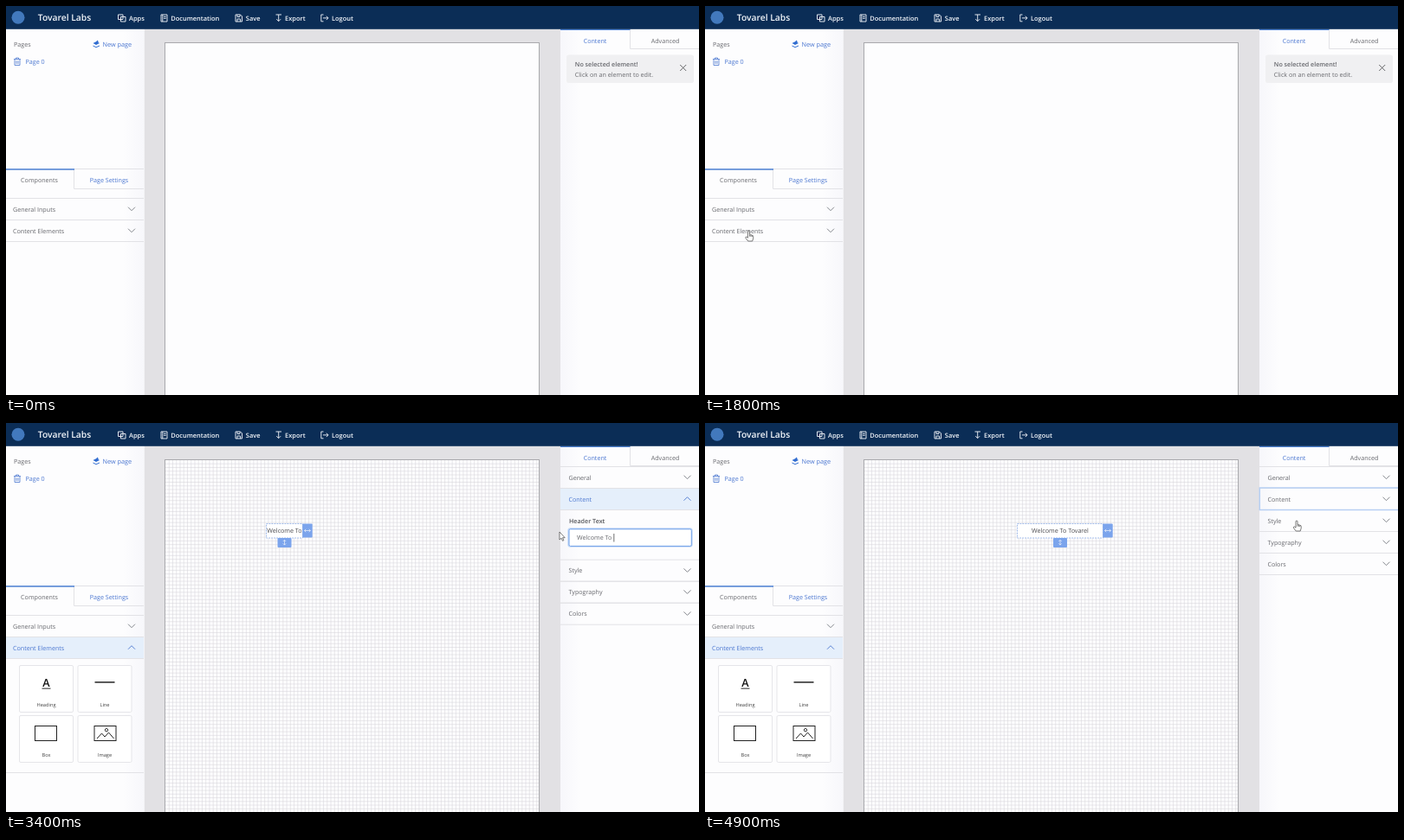
Animation of 800 by 450 pixels, one loop 5 s. Source, as an HTML page:

```html
<!DOCTYPE html>
<html lang="en">
<head>
<meta charset="utf-8">
<title>Page builder</title>
<style>
  html, body { margin: 0; width: 100%; height: 100%; overflow: hidden; background: #e2e1e4; }
  #stage { display: block; width: 800px; height: 450px; }
  text { font-family: "Open Sans", "Noto Sans", sans-serif; font-size: 7.15px; fill: #66676c;
         white-space: pre; text-rendering: geometricPrecision; }
  .mid { text-anchor: middle; }
  .link { fill: #4a76d0; }
  .bold { font-weight: 600; }
  .nav { font-size: 7.45px; font-weight: 600; fill: #f4f7fb; }
  .small { font-size: 5.7px; fill: #444; }
  .dark { fill: #4a4a4f; }
  .line { fill: none; stroke: #e2e2e6; }
  .ink { fill: none; stroke: #222; }
  .icon { fill: none; stroke: #f4f7fb; stroke-width: .9; }
  .grip { fill: none; stroke: #f4f7fb; stroke-width: .7; }
  .chev { fill: none; stroke: #777a80; stroke-width: .9; }
  .ring { fill: none; stroke: #b7cff3; stroke-width: 1.5; }
</style>
</head>
<body>
<svg id="stage" viewBox="0 0 800 450">
  <defs>
    <linearGradient id="shade">
      <stop offset="0" stop-color="#f7f7fb"/>
      <stop offset="1" stop-color="#fdfdfe"/>
    </linearGradient>
  </defs>
</svg>
<script>
const LOOP = 5000, STEP = 100;
const NAME = "Tovarel";
const PANEL = "#fdfdfe";
const stage = document.getElementById("stage");

function el(parent, tag, attrs = {}) {
  const node = document.createElementNS("http://www.w3.org/2000/svg", tag);
  set(node, attrs);
  parent.appendChild(node);
  return node;
}
function set(node, attrs) {
  for (const k in attrs) node.setAttribute(k, attrs[k]);
}
function show(node, on) { node.style.display = on ? "" : "none"; }
function rect(p, x, y, width, height, attrs) {
  return el(p, "rect", { x, y, width, height, ...attrs });
}
function path(p, d, cls, attrs) { return el(p, "path", { d, class: cls, ...attrs }); }
function label(p, x, y, str, cls = "") {
  const node = el(p, "text", { x, y: y + 2.6, class: cls });
  node.textContent = str;
  return node;
}
function move(node, x, y) { set(node, { transform: `translate(${x} ${y})` }); }

// ---------- page area ----------
rect(stage, 159, 26, 482, 424, { fill: "#e2e1e4" });
rect(stage, 183.5, 42.5, 432, 420, { fill: PANEL, stroke: "#a9a9ad" });
const grid = path(stage, gridPath(184, 43, 615, 450, 4.245), "", {
  fill: "none", stroke: "#d6d4da", "stroke-width": .53
});
function gridPath(x0, y0, x1, y1, gap) {
  let d = "";
  for (let x = x0 + gap; x < x1; x += gap) d += `M${x.toFixed(2)} ${y0}V${y1}`;
  for (let y = y0 + gap; y < y1; y += gap) d += `M${x0} ${y.toFixed(2)}H${x1}`;
  return d;
}

// ---------- heading element on the page ----------
const block = el(stage, "g");
const blockBox = rect(block, 0, 0, 42, 16.5, {
  fill: "#fff", stroke: "#86a9e6", "stroke-width": .8, "stroke-dasharray": "1.8 1.2"
});
const blockText = label(block, 0, 8.2, "", "mid dark");
const blockWrap = label(block, 0, 18, "", "mid dark");
const sideGrip = el(block, "g");
rect(sideGrip, 0, 0, 11.5, 16, { rx: 1, fill: "#7ba4ec" });
path(sideGrip, "M2.3 8H9.2M4 6.3L2.3 8L4 9.7M7.5 6.3L9.2 8L7.5 9.7", "grip");
const footGrip = el(block, "g");
rect(footGrip, -8, 0, 16, 11, { rx: 1, fill: "#7ba4ec" });
path(footGrip, "M0 2.4V8M-1.7 4L0 2.3L1.7 4M-1.7 6.4L0 8.1L1.7 6.4", "grip");

// ---------- side panels ----------
rect(stage, 0, 26, 159.5, 424, { fill: PANEL });
rect(stage, -159.5, 26, 24, 424, { fill: "url(#shade)", transform: "scale(-1 1)" });
rect(stage, 640, 26, 160, 424, { fill: PANEL });
rect(stage, 640, 26, 24, 424, { fill: "url(#shade)" });

label(stage, 9, 44, "Pages");
label(stage, 111.5, 44.3, "New page", "link").style.fontSize = "7.3px";
path(stage, "M100.5 43L104.5 41L108 43L104 45ZM100.5 45.5L104 47.3L108 45.5V46.5L104 48.3L100.5 46.5Z", "",
  { fill: "#2f6bd0" });
path(stage, "M105.5 39.8V42.6M104.1 41.2H106.9", "", { stroke: "#2f6bd0", "stroke-width": .9 });
label(stage, 22.5, 64.3, "Page 0", "link");
path(stage, "M9 61.5H17M11.5 61.3V60H14.5V61.3M10 61.8V68.5H16V61.8M12 63.3V67M14 63.3V67", "",
  { fill: "none", stroke: "#4a76d0", "stroke-width": .8 });

path(stage, "M79 188.5H159M78.5 189V211.5H159", "line");
rect(stage, 0, 188.2, 79, 1.5, { fill: "#4a7fd2" });
label(stage, 38.5, 201.6, "Components", "mid");
label(stage, 119, 201.4, "Page Settings", "mid link");

path(stage, "M720.5 27V49.5H800", "line");
rect(stage, 640, 26.5, 80.5, 1.5, { fill: "#4a7fd2" });
label(stage, 680, 40, "Content", "mid link");
label(stage, 761, 40, "Advanced", "mid");

// ---------- accordions ----------
function section(parent, x, w, name) {
  const g = el(parent, "g");
  const back = rect(g, x, 0, w, 25, { fill: "#e5effb" });
  path(g, `M${x} .5H${x + w}M${x} 25.5H${x + w}`, "line");
  const text = label(g, x + (x ? 9.5 : 8), 12.9, name);
  const chev = path(g, "", "chev");
  const mid = x ? 786.5 : 145;
  return {
    place(y, open) {
      move(g, 0, y);
      show(back, open);
      text.setAttribute("class", open ? "link" : "");
      chev.style.stroke = open ? "#4a76d0" : "";
      const s = open ? -2 : 2;
      set(chev, { d: `M${mid - 4} ${12.7 - s}L${mid} ${12.7 + s}L${mid + 4} ${12.7 - s}` });
    }
  };
}
function drawer(x, y, width) {
  return el(stage, "svg", { x, y, width, height: 0 });
}

function card(parent, i, name, art) {
  const g = el(parent, "g");
  move(g, 15.5 + (i % 2) * 67.5, 7.5 + Math.floor(i / 2) * 58);
  rect(g, 0, 0, 62, 54, { rx: 1.5, fill: "#fff", stroke: "#e5e5e9" });
  label(g, 31, 44.5, name, "mid small");
  art(g);
}
const frame = (x, y, w, h) => g => rect(g, x, y, w, h, { class: "ink" });

const inputs = drawer(0, 248, 159);
[["Input", frame(18, 14, 26, 11)],
 ["Text Area", frame(18, 11, 26, 18)],
 ["Checkbox", g => { frame(25, 13, 12, 12)(g); path(g, "M28 19L30.5 22L35 16", "ink"); }],
 ["Radio", g => el(g, "circle", { cx: 31, cy: 19, r: 6, class: "ink" })],
 ["Select", g => { frame(18, 14, 26, 11)(g); path(g, "M36 18L38.5 21L41 18", "ink"); }],
 ["Button", frame(20, 13, 22, 13)]
].forEach(([name, art], i) => card(inputs, i, name, art));

const parts = drawer(0, 273, 159);
[["Heading", g => {
   const a = label(g, 31, 22, "A", "mid bold");
   a.style.cssText = "font-size:12.6px;fill:#111";
   path(g, "M26 26.6H36", "ink");
 }],
 ["Line", g => path(g, "M19.5 19.4H42.5", "ink", { "stroke-width": 1.5 })],
 ["Box", frame(18, 12, 25, 17)],
 ["Image", g => {
   frame(19, 12, 25, 17)(g);
   path(g, "M22 26.5L27.5 20.5L31 24.5L35.5 19.5L41.5 26.5", "ink");
   el(g, "circle", { cx: 33, cy: 16.7, r: 1.7, class: "ink", "stroke-width": .9 });
 }]
].forEach(([name, art], i) => card(parts, i, name, art));
path(parts, "M0 131.5H159", "line");

const general = section(stage, 0, 159, "General Inputs");
const elements = section(stage, 0, 159, "Content Elements");
const leftRing = rect(stage, .3, 222.5, 158.7, 25.5, { class: "ring" });

const notice = el(stage, "g");
rect(notice, 647, 56.5, 147, 32.5, { rx: 2.5, fill: "#f0f0f2" });
label(notice, 656.8, 67.8, "No selected element!", "bold");
label(notice, 656.8, 79, "Click on an element to edit.");
path(notice, "M778.2 68L785.2 75M785.2 68L778.2 75", "chev", { style: "stroke:#55565a" });

const options = el(stage, "g");
const form = el(options, "svg", { x: 640, y: 100, width: 160, height: 0 });
label(form, 10, 13.4, "Header Text", "bold").style.fill = "#55565b";
const fieldGlow = rect(form, 9.5, 22.5, 142, 20, { rx: 2, fill: "none", stroke: "#c6daf7", "stroke-width": 2.4 });
const field = rect(form, 10, 22.8, 141.3, 19.6, { rx: 1.5, fill: "#fff" });
const mark = rect(form, 19, 27.5, 0, 10, { fill: "#a9cbf5" });
const fieldText = label(form, 19, 32.8, "");
const caret = rect(form, 19, 28, .7, 9.5, { fill: "#333" });
const rows = ["General", "Content", "Style", "Typography", "Colors"]
  .map(name => section(options, 640, 160, name));
const rightRing = rect(options, 640.3, 75, 161, 25.5, { class: "ring" });

// ---------- top bar ----------
rect(stage, 0, 0, 800, 26.8, { fill: "#0b2d56" });
el(stage, "circle", { cx: 14, cy: 13.3, r: 7.5, fill: "#4279bd" });
const brand = label(stage, 36.8, 14.6, NAME + " Labs", "nav");
brand.style.fontSize = "10.3px";
[[142, "Apps"], [190.3, "Documentation"], [276.8, "Save"], [322, "Export"], [376, "Logout"]]
  .forEach(([x, name]) => label(stage, x, 14.2, name, "nav"));
path(stage, "M129.5 10H135V15.5H129.5ZM132.5 12.5H138V18H132.5Z" +
  "M179 10H186V18H179ZM180.8 10V18M182 12.3H184.8M182 14.3H184.8" +
  "M265 10H270.5L272.5 12V18H265ZM267 10V12.5H270V10M267 18V15H270.5V18" +
  "M311.5 10H318M314.7 10V17.5M312.3 15.2L314.7 17.6L317.1 15.2" +
  "M366.5 10H363.8V17.8H366.5M366 13.9H372M369.8 11.7L372 13.9L369.8 16.1", "icon");

// ---------- pointer ----------
const arrow = path(stage, "M0 0V9L2.1 7.2L3.5 10.3L4.9 9.7L3.5 6.7H6.2Z", "",
  { fill: "#fff", stroke: "#444", "stroke-width": .7 });
const hand = path(stage,
  "M-1 1a1 1 0 0 1 2 0V4.3Q2 3.9 2.4 4.8Q3.5 4.5 3.8 5.4Q5.2 5.2 5.2 6.6V8.8L4.2 12H-.8" +
  "L-3.6 8.3Q-3.9 6.8-2.4 7L-1 8.2ZM1 4.5V6.6M2.4 5V6.8M3.8 5.5V7", "",
  { fill: "#fff", stroke: "#444", "stroke-width": .7 });

// time, x, y, shape
const trail = [
  [0, 478, 300, null], [100, 478, 300, arrow], [300, 110, 240, hand], [400, 45, 235, hand],
  [800, 45, 235, hand], [900, 45, 235, null], [1300, 30, 236, hand], [1800, 50.5, 260, hand],
  [2000, 50, 260, hand], [2100, 46, 296, hand], [2300, 321, 122, arrow], [2400, 330, 122, arrow],
  [2600, 674.5, 87, hand], [2800, 676, 88, hand], [3000, 705, 130, arrow], [3200, 640, 127, arrow],
  [3400, 639, 126, arrow], [3700, 348, 124, arrow], [3800, 348, 124, arrow], [3900, 405, 124, arrow],
  [4000, 359, 118, arrow], [4200, 419, 118, arrow], [4300, 419, 118, arrow], [4500, 640, 92, arrow],
  [4600, 680, 85, hand], [4800, 682, 88, hand], [4900, 683, 113, hand]
];
const typed = [[0, "Sample Text"], [3300, "Welcome"], [3400, "Welcome To "],
  [3500, "Welcome To " + NAME.slice(0, 4)], [3600, "Welcome To " + NAME]];

const ramp = (t, a, b) => Math.min(1, Math.max(0, (t - a) / (b - a)));
const within = (t, a, b) => t >= a && t < b;
const last = (table, t) => table.filter(row => row[0] <= t).pop();

function drawPointer(t) {
  const a = last(trail, t), b = trail[trail.indexOf(a) + 1] || a;
  const k = a === b ? 0 : ramp(t, a[0], b[0]);
  for (const shape of [arrow, hand]) {
    show(shape, shape === a[3]);
    move(shape, a[1] + (b[1] - a[1]) * k, a[2] + (b[2] - a[2]) * k);
  }
}

function drawLeft(t) {
  const top = 190 * (ramp(t, 400, 600) - ramp(t, 700, 900));
  const low = 132 * ramp(t, 1800, 2000);
  general.place(222, within(t, 400, 800));
  elements.place(247 + top, t >= 1900);
  set(inputs, { height: top });
  set(parts, { height: low });
  show(leftRing, within(t, 400, 1100));
}

function drawBlock(t, str) {
  const on = t >= 2300;
  show(grid, on);
  show(block, on);
  const w = 42 + 57 * ramp(t, 3800, 3900);
  move(block, 300.5 + 60 * ramp(t, 4000, 4200), 116.5);
  set(blockBox, { width: w });
  const wrap = w < 70 && str.length > 11;
  blockText.textContent = wrap ? str.slice(0, 10) : str.trim();
  blockWrap.textContent = wrap ? str.slice(11) : "";
  set(blockText, { x: w / 2 });
  set(blockWrap, { x: w / 2 });
  move(sideGrip, w - .3, 0);
  move(footGrip, w / 2, 16.5);
}

function drawOptions(t, str) {
  const on = t >= 2300;
  show(notice, !on);
  show(options, on);
  const shift = 57.7 * (ramp(t, 2700, 2900) - ramp(t, 4600, 4900));
  rows.forEach((row, i) => row.place(50 + i * 25 + (i > 1 ? shift : 0), i === 1 && within(t, 2700, 4600)));
  set(form, { height: shift });
  show(rightRing, within(t, 2700, 3000) || t >= 4600);

  const focus = within(t, 3000, 3700);
  show(fieldGlow, focus);
  set(field, { stroke: focus ? "#6f9fe8" : "#cfcfd5" });
  fieldText.textContent = str;
  const len = on ? fieldText.getComputedTextLength() : 0;
  const picked = within(t, 3000, 3300) ? len * ramp(t, 3000, 3200) : 0;
  set(mark, { x: 19 + len - picked, width: picked });
  show(caret, focus && !picked);
  set(caret, { x: 19 + len + .4 });
}

function draw(t) {
  const str = last(typed, t)[1];
  drawLeft(t);
  drawBlock(t, str);
  drawOptions(t, str);
  drawPointer(t);
}

const start = performance.now();
let shown = -1;
function tick() {
  const t = Math.floor((performance.now() - start) % LOOP / STEP) * STEP;
  if (t !== shown) draw(shown = t);
  requestAnimationFrame(tick);
}
tick();
</script>
</body>
</html>
```
